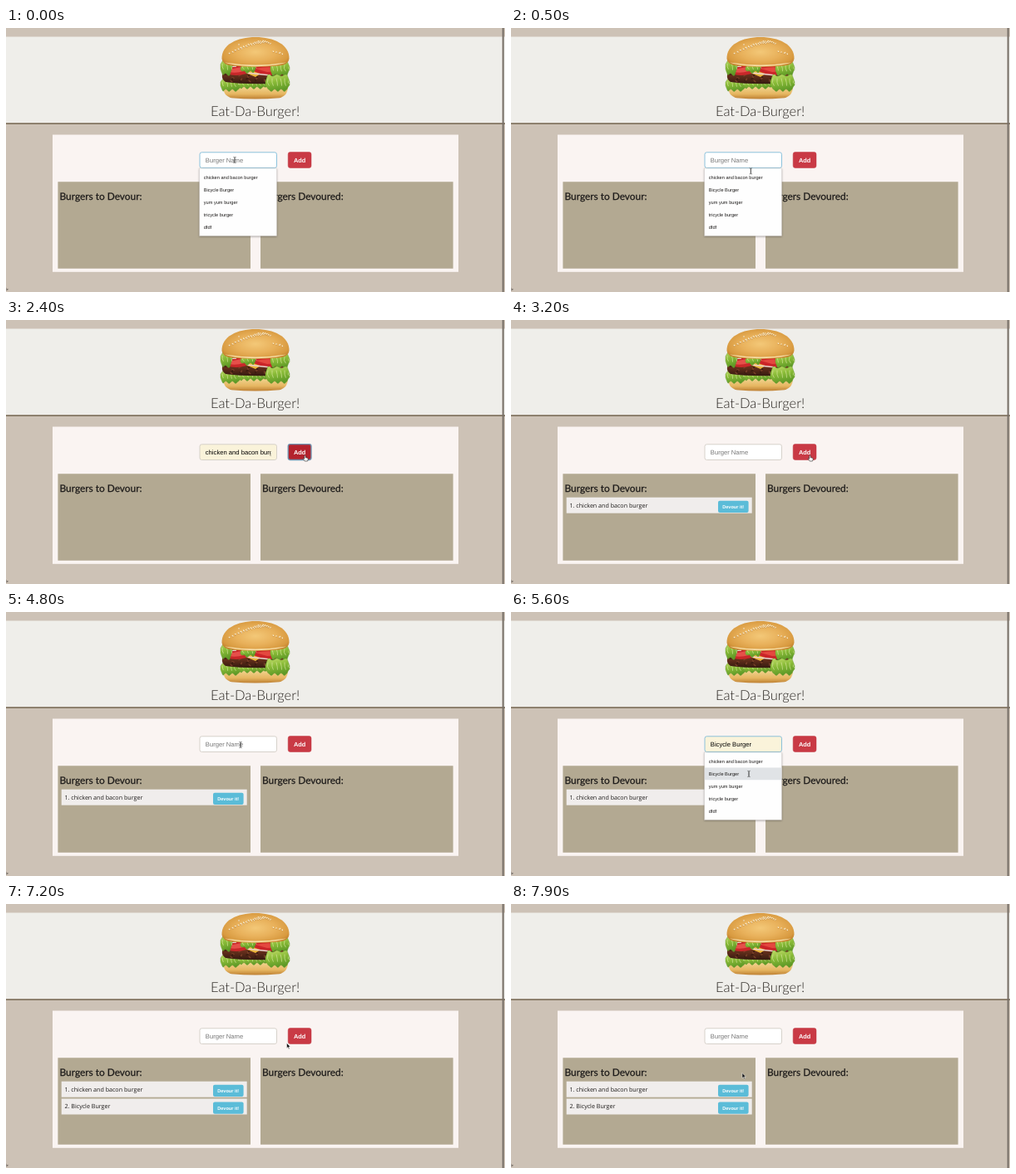
Recreate the animation shown at these times as an HTML page. Size 600 by 318 pixels, loop 8 s.

```html
<!DOCTYPE html>
<html lang="en">
<head>
<meta charset="utf-8">
<title>Eat-Da-Burger!</title>
<style>
  html, body { margin: 0; width: 100%; height: 100%; overflow: hidden; background: #cdc2b6; }
  svg { display: block; width: 600px; height: 318px; }
  text { text-rendering: geometricPrecision; fill: #1c1a19; white-space: pre; }
  .title { font: 300 16.5px Lato, "Open Sans", sans-serif; fill: #2a2521; }
  .head { font: 11.9px Lato, "Open Sans", sans-serif; stroke: #1c1a19; stroke-width: .25px; }
  .item { font: 7.13px "Open Sans", "Noto Sans", sans-serif; }
  .input { font: 7.65px "Liberation Sans", Arial, sans-serif; }
  .option { font: 5.65px "Liberation Sans", Arial, sans-serif; }
  .btn { font: bold 7.4px "Liberation Sans", Arial, sans-serif; fill: #fff; }
  .small { font-size: 5.57px; }
</style>
</head>
<body>
<svg viewBox="0 0 600 318">
  <defs>
    <radialGradient id="crust" cx=".5" cy=".5" r=".6">
      <stop offset="0" stop-color="#f3c878"/>
      <stop offset=".5" stop-color="#e8b05a"/>
      <stop offset=".85" stop-color="#d89a40"/>
      <stop offset="1" stop-color="#c17f2c"/>
    </radialGradient>
    <linearGradient id="base" x2="0" y2="1">
      <stop offset="0" stop-color="#f4dc9d"/>
      <stop offset=".65" stop-color="#e6b661"/>
      <stop offset="1" stop-color="#bd7f32"/>
    </linearGradient>
    <linearGradient id="meat" x2="0" y2="1">
      <stop offset="0" stop-color="#7d3a22"/>
      <stop offset=".5" stop-color="#5a2a19"/>
      <stop offset="1" stop-color="#351a10"/>
    </linearGradient>
    <linearGradient id="leaf" x2=".3" y2="1">
      <stop offset="0" stop-color="#c3dd6b"/>
      <stop offset=".5" stop-color="#8abb38"/>
      <stop offset="1" stop-color="#5f9a27"/>
    </linearGradient>
    <filter id="shadow" x="-10%" y="-10%" width="120%" height="130%">
      <feDropShadow dx="0" dy=".8" stdDeviation=".9" flood-opacity=".35"/>
    </filter>
    <clipPath id="inputClip"><rect x="239" y="150" width="79.6" height="18"/></clipPath>
  </defs>

  <rect width="600" height="318" fill="#cdc2b6"/>
  <rect y="10.5" width="600" height="104" fill="#efeeea"/>
  <rect y="114.4" width="600" height="1.5" fill="#766853"/>
  <g id="burger"></g>
  <text class="title" x="246" y="105.5">Eat-Da-Burger!</text>

  <rect x="56" y="128.5" width="488" height="165.3" fill="#faf4f2"/>
  <path d="M62.4 185.2H294V289.8H62.4ZM306 185.2H537.6V289.8H306Z" fill="#b3a992"/>
  <text class="head" x="64.5" y="207">Burgers to Devour:</text>
  <text class="head" x="308" y="207">Burgers Devoured:</text>
  <text class="item" x="-.5" y="317.3" style="font-size:6px">&gt;</text>
  <rect x="596.7" width="2" height="318" fill="#776f67"/>

  <g id="list"></g>
  <rect id="field" x="233" y="149.8" width="92.5" height="18.7" rx="2.4" stroke-width=".9"/>
  <g clip-path="url(#inputClip)"><text id="value" class="input" x="239.8" y="161.8"></text></g>
  <rect id="add" x="339.2" y="149.6" width="27.8" height="18.9" rx="2.4"/>
  <text class="btn" x="346" y="161.8">Add</text>
  <g id="popup"></g>

  <g id="cursor">
    <path data-kind="beam" d="M-1.6-3.6Q0-3.6 0-2.6V2.6Q0 3.6-1.6 3.6M1.6-3.6Q0-3.6 0-2.6V2.6Q0 3.6 1.6 3.6" fill="none" stroke="#333" stroke-width=".6"/>
    <path data-kind="hand" d="M-.7.4Q0-.5.7.4V2.6L3.2 3.3Q4 3.7 3.7 5L3 7H-.3L-2.3 4.3Q-2.2 3.4-1.4 3.8L-.7 4.3Z" fill="#fff" stroke="#222" stroke-width=".6"/>
    <path data-kind="arrow" d="M0 0V6.2L1.4 5L2.4 7.2L3.4 6.7L2.4 4.6H4.3Z" fill="#111" stroke="#fff" stroke-width=".5"/>
  </g>
</svg>

<script>
const $ = id => document.getElementById(id);
const LOOP = 8000, STEP = 100;
const names = ["chicken and bacon burger", "Bicycle Burger", "yum yum burger", "tricycle burger", "dfdf"];

// pick: chosen name, rows: options shown, items: burgers listed
const changes = [
  [0, { pick: -1, focus: true, rows: 5, pressed: false, items: 0 }],
  [600, { pick: 0 }],
  [900, { rows: 1 }],
  [1300, { rows: 0 }],
  [2300, { focus: false, pressed: true }],
  [2800, { pick: -1, pressed: false, items: 1 }],
  [4900, { focus: true }],
  [5000, { rows: 5 }],
  [5400, { pick: 1 }],
  [5700, { rows: 1 }],
  [5900, { rows: 0 }],
  [6400, { focus: false, pressed: true }],
  [6900, { pick: -1, pressed: false, items: 2 }]
];

// time, x, y of the pointer
const path = [
  [0, 275, 159], [100, 275, 159], [700, 293, 177], [1300, 293, 177],
  [2100, 359.5, 163], [3900, 359.5, 163], [4700, 282, 160], [4900, 282, 160],
  [5400, 286, 195], [5800, 286, 195], [6300, 354, 157.5], [6900, 354, 157.5],
  [7900, 278, 203.5], [8000, 278, 203.5]
];

function drawBurger() {
  // ruffled leaf between two heights
  const leaf = (x0, x1, top, bottom, phase) => {
    const upper = [], lower = [], mid = (top + bottom) / 2;
    let veins = "";
    for (let x = x0; x <= x1; x++) {
      const half = (bottom - top) / 2 * Math.min(1, (x - x0 + 1) / 4, (x1 - x + 1) / 4);
      upper.push(`${x},${(mid - half + Math.sin(x * .6 + phase)).toFixed(1)}`);
      lower.unshift(`${x},${(mid + half + 1.4 * Math.sin(x * .8 + phase)).toFixed(1)}`);
      if (x % 5 === 0) veins += `M${x} ${mid - half * .6}q${2 * Math.sin(x + phase)} ${half * .6} 1.5 ${half}`;
    }
    return `<polygon points="${upper.concat(lower).join(" ")}" fill="url(#leaf)" stroke="#5c9429" stroke-width=".4"/>
      <path d="${veins}" fill="none" stroke="#e0edaa" stroke-width=".8" opacity=".75"/>`;
  };
  const oval = (x, y, rx, ry, fill, turn = 0) =>
    `<ellipse cx="${x}" cy="${y}" rx="${rx}" ry="${ry}" fill="${fill}" transform="rotate(${turn} ${x} ${y})"/>`;

  let out = `<path d="M261 68Q260 81 271 84.2Q300 87 329 84.2Q340 81 339 68Z" fill="url(#base)"/>`;
  out += leaf(258, 283, 61, 75, .6) + leaf(280, 314, 63, 72, 2);
  out += `<path d="M263 42H337V58H263Z" fill="#8a4a26"/>`;
  out += `<path d="M260 56Q262 52 270 52L330 54Q338 56 337 61Q335 66 318 67Q285 68 264 65Q259 62 260 56Z" fill="url(#meat)"/>`;
  for (let i = 0; i < 24; i++) {
    out += oval(264 + i * 29 % 68, 56 + i * 17 % 9, 2, .8, i % 2 ? "#7a4029" : "#3a1b10", i * 40);
  }
  out += `<path d="M290 47L322 50L316 57L306 55L300 59L288 54Z" fill="#eab63d"/>`;
  out += `<path d="M266 48L284 45L289 55Q276 59 266 55Z" fill="#c9282a"/>`;
  out += `<path d="M268 50L283 47L286 52Q276 55 268 53Z" fill="#e5504a"/>`;
  out += `<path d="M296 48Q312 44 329 47Q329 55 318 57Q304 56 296 51Z" fill="#cb2529"/>`;
  out += `<path d="M300 49Q313 46 326 48Q324 53 314 53Z" fill="#e4483f"/>`;
  out += `<path d="M264 47L277 46M290 54L318 57" stroke="#ecd3cf" stroke-width="1.5"/>`;
  out += leaf(258, 272, 38, 56, 1) + leaf(282, 300, 43, 53, 2);
  out += leaf(318, 341, 41, 57, 3) + leaf(312, 341, 57, 75, 4);
  out += `<path d="M259.5 37C259 20 278 11 300 11S341 20 340.5 37Q340 44 328 45.5Q300 48 272 45.5Q260 44 259.5 37Z" fill="url(#crust)"/>`;
  out += `<path d="M263 41.5Q300 47.5 337 41.5Q330 45 300 46.3Q270 45 263 41.5Z" fill="#f6dda5"/>`;
  for (let i = 0; i < 46; i++) {
    const u = (i * .618) % 1 * 2 - 1, v = (i * .377) % 1;
    const x = 300 + u * (20 + v * 15), y = 13 + v * 13 + u * u * 7;
    out += oval(x, y + .4, 1.1, .7, "#bd8236", i * 37) + oval(x, y, 1, .65, "#fff1cf", i * 37);
  }
  $("burger").innerHTML = out;
}

function stateAt(t) {
  return Object.assign({}, ...changes.filter(c => c[0] <= t).map(c => c[1]));
}

function pointAt(t) {
  const i = path.findIndex((p, n) => n && t <= p[0]);
  const [t0, x0, y0] = path[i - 1], [t1, x1, y1] = path[i];
  const u = (t - t0) / (t1 - t0), k = u * u * (3 - 2 * u);
  return [x0 + (x1 - x0) * k, y0 + (y1 - y0) * k];
}

function popupMarkup({ rows, pick }) {
  if (!rows) return "";
  const shown = rows === 1 ? [names[pick]] : names;
  const height = shown.length * 15 + 6.3;
  let out = `<rect x="232.7" y="169" width="92.8" height="${height}" fill="#fefefe" stroke="#c5c2bf" stroke-width=".4" filter="url(#shadow)"/>`;
  shown.forEach((name, i) => {
    const y = 172.5 + i * 15;
    if (name === names[pick]) out += `<rect x="232.9" y="${y}" width="92.4" height="14.8" fill="#e0e3e6"/>`;
    out += `<text class="option" x="237.7" y="${y + 9.6}">${name}</text>`;
  });
  return out;
}

function listMarkup(count) {
  return names.slice(0, count).map((name, i) =>
    `<g transform="translate(0 ${i * 20.8})">
      <rect x="66.7" y="213.7" width="223" height="19" fill="#f0edec"/>
      <text class="item" x="70.5" y="225.7">${i + 1}. ${name}</text>
      <rect x="249" y="217.8" width="36.6" height="14.2" rx="2" fill="#5bbcd8"/>
      <text class="btn small" x="254.2" y="227">Devour it!</text>
    </g>`).join("");
}

function set(el, attrs) {
  for (const key in attrs) el.setAttribute(key, attrs[key]);
}

function render(t) {
  const s = stateAt(t), filled = s.pick >= 0;
  set($("field"), {
    fill: filled ? "#faf3da" : "#fff",
    stroke: s.focus ? "#7fbcd8" : filled && s.items ? "#a9c6dc" : "#d3cdc6"
  });
  $("value").textContent = filled ? names[s.pick] : "Burger Name";
  $("value").style.fill = filled ? "#000" : "#777";
  set($("add"), {
    fill: s.pressed ? "#b3222d" : "#c93a45",
    stroke: s.pressed ? "#6d93b0" : "#bd323d",
    "stroke-width": s.pressed ? 1.3 : .5
  });
  $("popup").innerHTML = popupMarkup(s);
  $("list").innerHTML = listMarkup(s.items);

  const [x, y] = pointAt(t);
  const inField = x > 233 && x < 326 && y > 150 && y < 168.5;
  const inPopup = s.rows && x > 233 && x < 326 && y > 168 && y < 252;
  const onAdd = x > 339 && x < 367 && y > 149 && y < 169;
  const kind = inField || inPopup ? "beam" : onAdd ? "hand" : "arrow";
  set($("cursor"), { transform: `translate(${x} ${y})` });
  for (const shape of $("cursor").children) {
    shape.style.display = shape.dataset.kind === kind ? "" : "none";
  }
}

let last = -1;
function tick() {
  const t = Math.floor(performance.now() % LOOP / STEP) * STEP;
  if (t !== last) render(last = t);
  requestAnimationFrame(tick);
}

drawBurger();
tick();
</script>
</body>
</html>
```
